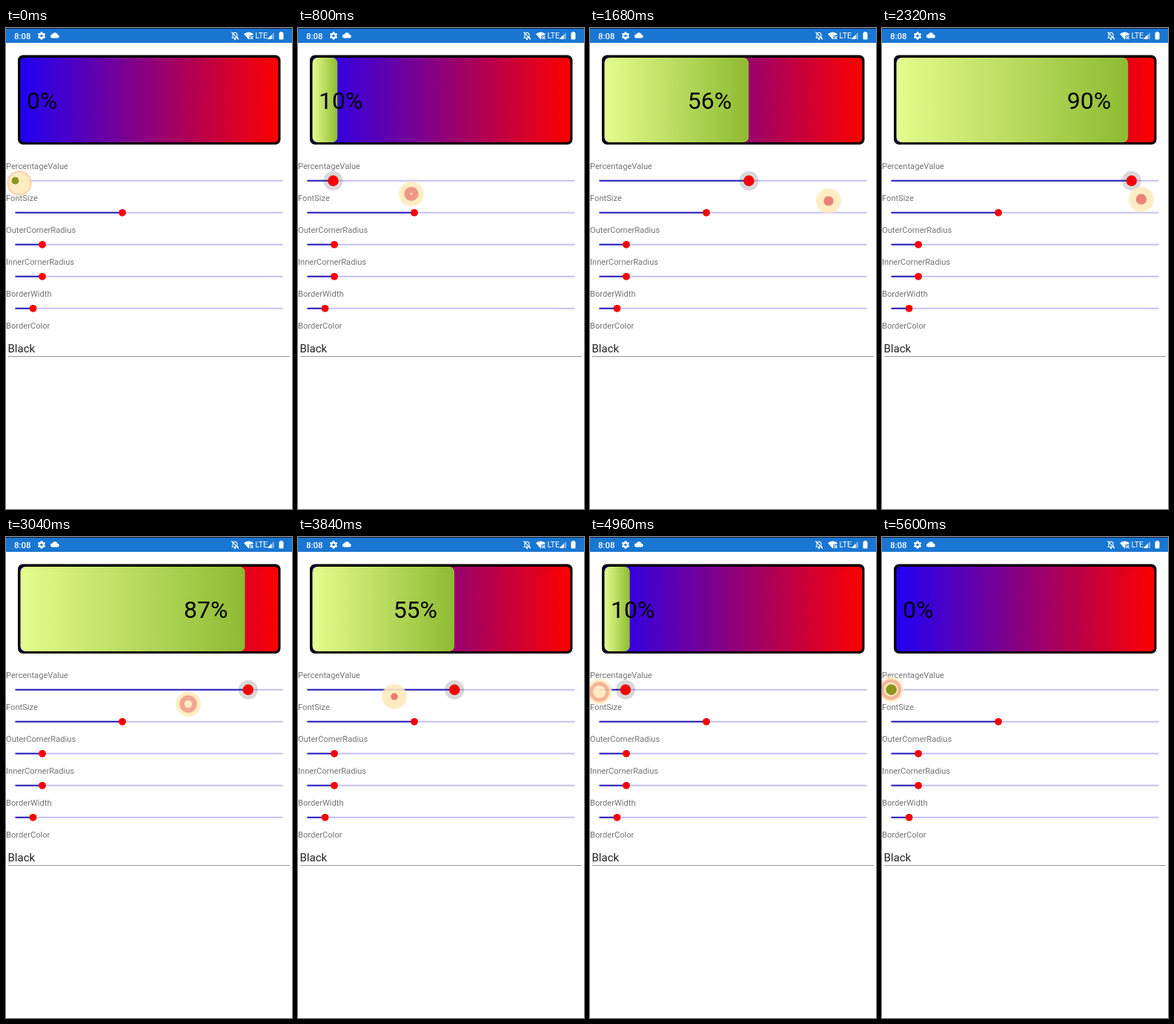
Animation, 386 px wide and 648 px high, one loop 5680 ms. Source, as an HTML page with a canvas:

```html
<!DOCTYPE html>
<html lang="en">
<head>
<meta charset="utf-8">
<title>Battery view sliders</title>
<style>
html, body { margin: 0; width: 100%; height: 100%; overflow: hidden; background: #fff; }
canvas { display: block; width: 386px; height: 648px; }
</style>
</head>
<body>
<canvas id="stage" width="386" height="648"></canvas>
<script>
const ctx = document.getElementById('stage').getContext('2d');
const LOOP = 5680, STEP = 80, LAG = 560;
const TRACK_LEFT = 12.5, TRACK_WIDTH = 361;
const RIPPLE_PERIOD = 314;
const BLUE = '#1976d2', RED = '#f50000';

// Finger path: time, x, y
const PATH = [
  [0, 18, 209], [80, 18, 210], [240, 47.5, 214], [800, 153, 223.5],
  [1680, 322, 233], [1950, 372, 234], [2160, 373, 232], [3040, 246, 225],
  [3840, 130, 215], [4400, 48, 213], [4640, 13, 210], [5600, 12, 205.5]
];

function finger(t) {
  if (t < 0) return { x: TRACK_LEFT, y: 209 };
  const i = Math.max(1, PATH.findIndex(p => p[0] >= t));
  const [t0, x0, y0] = PATH[i - 1], [t1, x1, y1] = PATH[i];
  const k = (t - t0) / (t1 - t0);
  return { x: x0 + (x1 - x0) * k, y: y0 + (y1 - y0) * k };
}

function valueAt(t) {
  return Math.min(1, Math.max(0, (finger(t - LAG).x - TRACK_LEFT) / TRACK_WIDTH));
}

function disc(x, y, r, fill) {
  ctx.fillStyle = fill;
  ctx.beginPath();
  ctx.arc(x, y, r, 0, Math.PI * 2);
  ctx.fill();
}

function box(x, y, w, h, r, fill) {
  ctx.fillStyle = fill;
  ctx.beginPath();
  ctx.roundRect(x, y, w, h, Math.min(r, w / 2));
  ctx.fill();
}

function shape(d, fill) {
  ctx.fillStyle = fill;
  ctx.fill(new Path2D(d));
}

function line(d, color, width) {
  ctx.strokeStyle = color;
  ctx.lineWidth = width;
  ctx.stroke(new Path2D(d));
}

function label(text, x, y, size, color, weight = 400) {
  ctx.font = `${weight} ${size}px Roboto, sans-serif`;
  ctx.fillStyle = color;
  ctx.fillText(text, x, y);
}

function blend(x0, x1, from, to) {
  const g = ctx.createLinearGradient(x0, 0, x1, 0);
  g.addColorStop(0, from);
  g.addColorStop(1, to);
  return g;
}

function statusBar() {
  box(0, 0, 386, 20, 0, BLUE);
  box(0, 0, 386, 1, 0, '#101a30');
  label('8:08', 11, 14.5, 11.5, '#fff', 500);
  // gear
  disc(48, 10.5, 4, '#fff');
  for (let i = 0; i < 6; i++) {
    const a = i * Math.PI / 3 + Math.PI / 6;
    disc(48 + 4 * Math.cos(a), 10.5 + 4 * Math.sin(a), 1.4, '#fff');
  }
  disc(48, 10.5, 1.7, BLUE);
  // cloud
  disc(62.5, 11, 2.5, '#fff');
  disc(66, 9.8, 3.5, '#fff');
  disc(69.5, 11.2, 2.3, '#fff');
  box(62, 10.5, 8, 3, 1, '#fff');
  // muted bell
  line('M306 13 V9.5 Q306 6.5 309 6.3 Q312 6.5 312 9.5 V13 M304.5 13.2 H313.5', '#fff', 1.1);
  disc(309, 15, 1.2, '#fff');
  line('M304.5 5.5 L314 15.5', '#fff', 1.1);
  // wifi with a cross
  shape('M321 8 Q327.5 3 334 8 L327.5 15.5 Z', '#fff');
  box(328.5, 10, 6, 6, 0, BLUE);
  line('M329.5 11 L333.5 15 M333.5 11 L329.5 15', '#fff', 1.1);
  label('LTE', 336.5, 14, 10.5, '#fff');
  // signal and battery
  shape('M352.5 15 L362 5.5 V15 Z', 'rgba(255,255,255,.4)');
  shape('M352.5 15 L358.5 9 V15 Z', '#fff');
  box(368.5, 6, 6, 9.5, 1, '#fff');
  box(370, 5, 3, 2, 0, '#fff');
}

function battery(value) {
  box(16, 36.5, 354.5, 120.5, 7, '#000');
  box(19.5, 40, 348, 114, 5, blend(19.5, 367.5, '#2000f5', '#fc0000'));
  const width = 348 * value, end = 19.5 + width;
  if (width > 0.5)
    box(19.5, 40, width, 114, 7, blend(19.5, end, '#e4fc8c', '#8fbb33'));
  const text = Math.round(value * 100) + '%';
  ctx.font = '400 32px Roboto, sans-serif';
  const x = Math.max(28, end - 23 - ctx.measureText(text).width);
  label(text, x, 108.5, 32, '#000');
}

function slider(name, y, x, pressed) {
  label(name, 0, y - 15.7, 11.15, '#757575');
  box(TRACK_LEFT, y - 1, TRACK_WIDTH, 2, 0, '#c5c1f1');
  box(TRACK_LEFT, y - 1, x - TRACK_LEFT, 2, 0, '#2a20b8');
  if (pressed) disc(x, y, 13, 'rgba(60,60,70,.2)');
  disc(x, y, pressed ? 7.2 : 4.9, RED);
}

function touch(t, thumbX, thumbR) {
  const { x, y } = finger(t), R = 17.5;
  const glow = ctx.createRadialGradient(x, y, 0, x, y, R);
  glow.addColorStop(0, 'rgba(254,234,188,.92)');
  glow.addColorStop(0.88, 'rgba(254,234,188,.88)');
  glow.addColorStop(1, 'rgba(254,234,188,.3)');
  disc(x, y, R, glow);

  const phase = (t / RIPPLE_PERIOD + 0.95) % 1;
  const outer = 2 + 15.3 * phase;
  const hole = Math.max(0, (phase - 0.45) * 29);
  ctx.fillStyle = `rgba(226,70,75,${Math.min(0.68, 0.87 - 0.72 * phase)})`;
  ctx.beginPath();
  ctx.arc(x, y, outer, 0, Math.PI * 2);
  if (hole) ctx.arc(x, y, Math.min(hole, outer - 1.5), 0, Math.PI * 2, true);
  ctx.fill();

  // the thumb shows olive through the finger mark
  ctx.save();
  ctx.beginPath();
  ctx.arc(x, y, R, 0, Math.PI * 2);
  ctx.clip();
  disc(thumbX, 205.7, thumbR, '#8c961e');
  ctx.restore();
}

function draw(t) {
  const value = valueAt(t), pressed = t >= LAG;
  const thumbX = TRACK_LEFT + TRACK_WIDTH * value;
  ctx.fillStyle = '#fff';
  ctx.fillRect(0, 0, 386, 648);
  statusBar();
  battery(value);
  slider('PercentageValue', 205.8, thumbX, pressed);
  slider('FontSize', 248.8, 157, false);
  slider('OuterCornerRadius', 291.8, 49, false);
  slider('InnerCornerRadius', 334.8, 49, false);
  slider('BorderWidth', 377.8, 36.5, false);
  label('BorderColor', 0, 405, 11.15, '#757575');
  label('Black', 2.5, 437, 15, '#212121');
  box(3, 442, 380, 1, 0, '#969696');
  touch(t, thumbX, pressed ? 7.2 : 4.9);
}

function tick() {
  const t = performance.now() % LOOP;
  draw(Math.floor(t / STEP) * STEP);
  requestAnimationFrame(tick);
}
tick();
</script>
</body>
</html>
```
